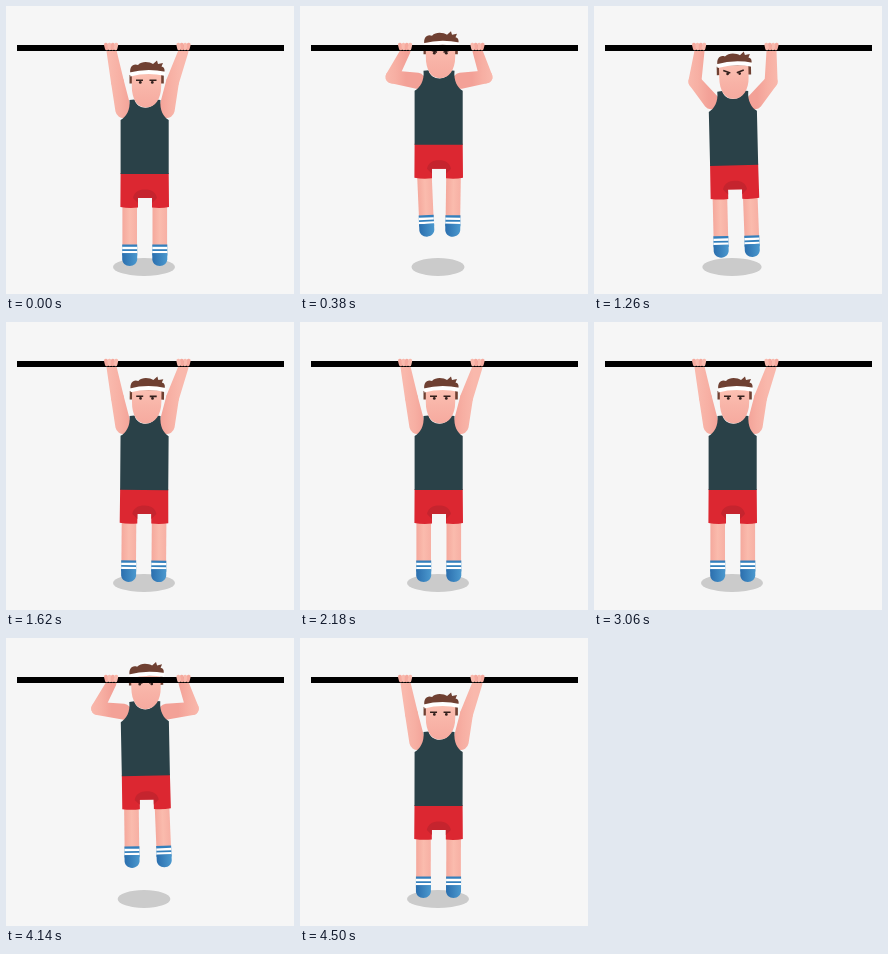
An HTML page with a canvas for the animation above (4540 ms loop, 288x288 px).

```html
<!DOCTYPE html>
<html lang="en">
<head>
<meta charset="utf-8">
<title>Pull-ups</title>
<style>
html, body { margin: 0; height: 100%; overflow: hidden; background: #f6f6f6; }
canvas { display: block; width: 100vw; height: 100vh; }
</style>
</head>
<body>
<canvas id="stage" width="288" height="288"></canvas>
<script>
const ctx = document.getElementById('stage').getContext('2d');
const LOOP = 4540, STEP = 40, LIFT = 39;
const NAVY = '#2a4148', RED = '#dc2731', BLUE = '#3480bd', BROWN = '#6f4032', DARK = '#33201d';

// Foot sway in pixels over one repetition: [ms, left, right]
const SWAY = [[0, 0, 0], [300, 3, -1], [600, 9, -5], [760, -3, 4], [1200, 0, 1], [1400, 0, 0]];

const ease = x => (1 - Math.cos(Math.PI * Math.min(1, Math.max(0, x)))) / 2;
const lift = t => LIFT * (ease(t / 480) - ease((t - 980) / 320));

// Damped swing of the body on the way down
function swing(t) {
  const s = t - 980;
  return s > 0 && s < 1140 ? 0.036 * (1 - s / 1140) ** 2 * Math.sin(Math.PI * s / 440) : 0;
}

function sway(t, side) {
  const i = SWAY.findIndex(key => key[0] > t);
  if (i < 1) return 0;
  const a = SWAY[i - 1], b = SWAY[i];
  return a[side] + (b[side] - a[side]) * ease((t - a[0]) / (b[0] - a[0]));
}

function gradient(x1, y1, x2, y2, ...colors) {
  const g = ctx.createLinearGradient(x1, y1, x2, y2);
  colors.forEach((c, i) => g.addColorStop(i / (colors.length - 1), c));
  return g;
}

function fill(d, color) {
  ctx.fillStyle = color;
  ctx.fill(new Path2D(d));
}

function line(d, color, width) {
  ctx.strokeStyle = color;
  ctx.lineWidth = width;
  ctx.stroke(new Path2D(d));
}

function rect(x, y, w, h, color) {
  ctx.fillStyle = color;
  ctx.fillRect(x, y, w, h);
}

function oval(x, y, rx, ry, color) {
  ctx.fillStyle = color;
  ctx.beginPath();
  ctx.ellipse(x, y, rx, ry, 0, 0, 2 * Math.PI);
  ctx.fill();
}

// Tapered limb segment with round ends
function limb(x1, y1, r1, x2, y2, r2, color) {
  const a = Math.atan2(y2 - y1, x2 - x1);
  ctx.fillStyle = color;
  ctx.beginPath();
  ctx.arc(x1, y1, r1, a + Math.PI / 2, a - Math.PI / 2);
  ctx.arc(x2, y2, r2, a - Math.PI / 2, a + Math.PI / 2);
  ctx.fill();
}

// Runs draw() mirrored about the vertical line x = axis
function mirrored(axis, draw) {
  ctx.save();
  ctx.translate(2 * axis, 0);
  ctx.scale(-1, 1);
  draw();
  ctx.restore();
}

function arm(wristX, up) {
  const k = up / LIFT;
  const ex = 111.5 - 22.5 * Math.sqrt(k), ey = 76 - 9 * k * k;
  const skin = gradient(ex - 7, 0, ex + 14, 0, '#f9b8ac', '#f7afa3', '#f3a197');
  limb(117.3, 104 - up, 8, ex, ey, 6.5, skin);
  limb(ex, ey, 6.5, wristX, 45, 5, skin);
}

function hand() {
  for (let i = 0; i < 4; i++) limb(100 + i * 3.4, 38.8, 2, 100.8 + i * 2.9, 42.3, 1.9, i % 2 ? '#f9b9ad' : '#f5a99e');
}

function leg(x, dx) {
  ctx.save();
  ctx.translate(x, 182);
  ctx.rotate(-Math.atan(dx / 70));
  rect(-7.3, 0, 14.6, 58, gradient(-7, 0, 7, 0, '#f5a99d', '#fabbad', '#f7b0a4'));
  rect(-7.5, 56.5, 15, 11, BLUE);
  rect(-7.5, 58.8, 15, 2.4, '#fff');
  rect(-7.5, 63, 15, 2.2, '#fff');
  fill('M-7.5 65.2H7.5V70C8 75 4 78 0 78S-8 75-7.5 70Z', gradient(-7, 0, 7, 0, '#2c70af', '#4a97cd'));
  ctx.restore();
}

function shorts() {
  fill('M114.6 167H162.7L163 201Q155 202.5 146 201.5V192H132V201.5Q123 202.5 114.4 201Z', RED);
  fill('M127 192C128 186 133 183.5 139 183.5S150 186 151 192L146 197V192H132V197Z', '#c5242e');
}

function torso() {
  fill('M123.5 94C124.5 104 120 111 114.6 114V168H162.7V114C157.5 111 153.5 104 154.5 94L150 93.5C148 104.5 131 104.5 128.5 93.5Z', NAVY);
}

function head(straining) {
  rect(123.5, 69, 4, 8.5, BROWN);
  rect(153.8, 69, 4, 8.5, BROWN);
  fill('M125.8 67H155.2V80C155.2 93 149 101.5 140 101.5S125.8 93 125.8 80Z',
    gradient(0, 68, 0, 102, '#fbc0b2', '#f8b3a7', '#f6aa9f'));
  fill('M124.5 68C123 61 127 57 132 59C136 54.5 144 56 147 58L151 54.5L152 58L157 57L155.5 60.5Q160 61.5 158 68Z', BROWN);
  line('M124 68.5Q141 64 159 67.8', '#fff', 4);
  oval(134.3, 76.4, 1.4, 1.4, DARK);
  oval(146.3, 76.4, 1.4, 1.4, DARK);
  line(straining ? 'M130 73L137 75.5M150.5 73L143.5 75.5' : 'M130 74.3H137M143.5 74.3H150.5', DARK, 1.6);
}

function draw(t) {
  const up = lift(t);
  rect(0, 0, 288, 288, '#f6f6f6');
  oval(138, 261, 31 - 6 * up / LIFT, 9, '#cbcbcb');

  arm(105.5, up);
  mirrored(139, () => arm(100.5, up));

  ctx.save();
  ctx.translate(139, 105 - up);
  ctx.rotate(-swing(t));
  ctx.translate(-139, -105);
  leg(123.7, sway(t, 1));
  leg(153.8, sway(t, 2));
  shorts();
  torso();
  head(up > 5);
  ctx.restore();

  rect(11, 39, 267, 6, '#000');
  hand();
  mirrored(141.3, hand);
}

function frame() {
  const now = performance.now() % LOOP;
  const t = Math.floor((now - 20) / STEP) * STEP + 20;
  draw(Math.max(0, t < 3060 ? t - 60 : t - 3060));
  requestAnimationFrame(frame);
}
frame();
</script>
</body>
</html>
```
